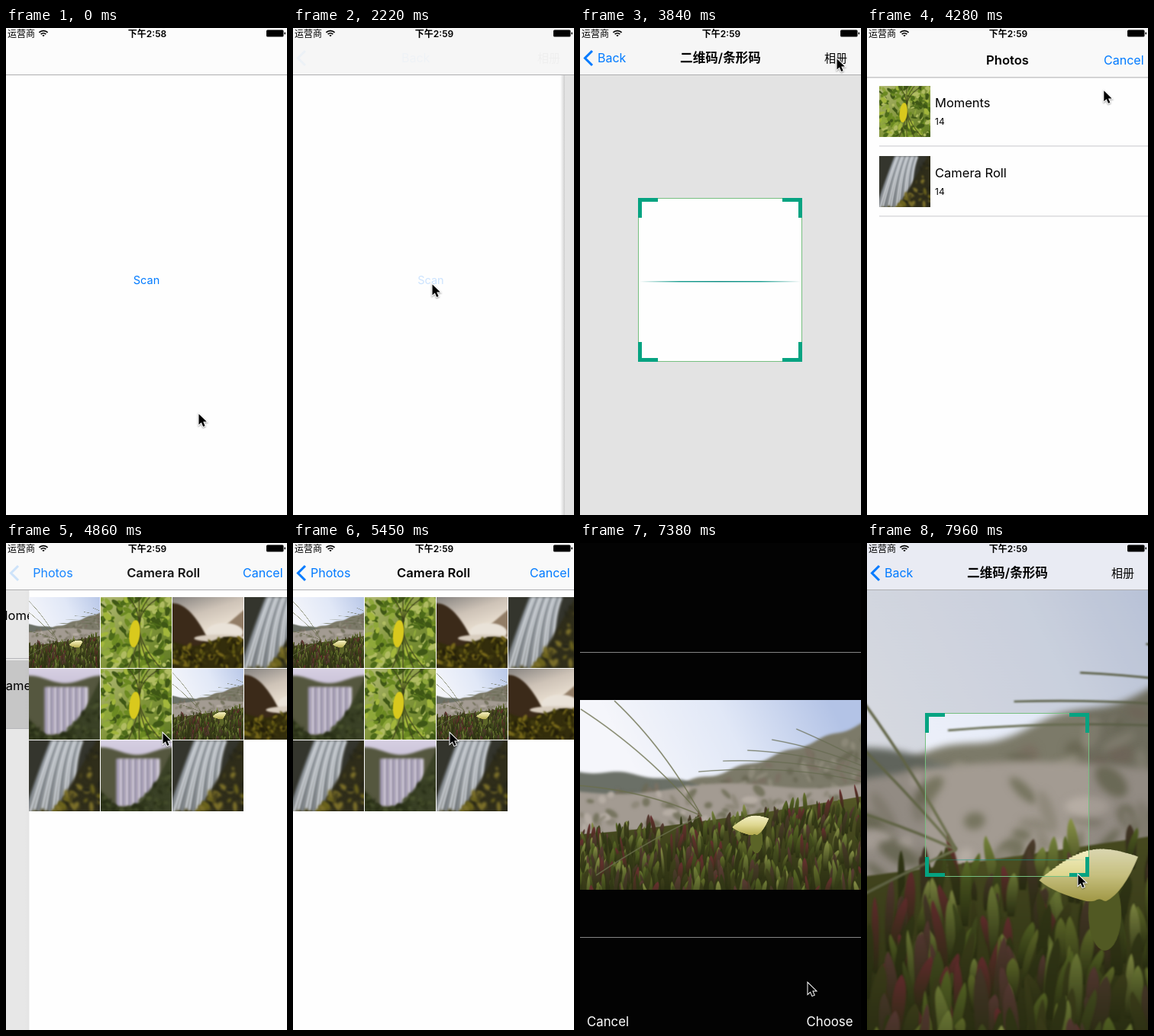
An HTML page with a canvas that plays this animation: 368x639 px, repeating every 8 s.

```html
<!DOCTYPE html>
<html lang="zh-CN">
<head>
<meta charset="utf-8">
<title>Scan demo</title>
<style>
html, body { margin: 0; width: 100%; height: 100%; overflow: hidden; background: #fff; }
canvas { display: block; width: 100vw; height: 100vh; }
</style>
</head>
<body>
<canvas id="stage" width="368" height="639"></canvas>
<script>
const W = 368, H = 639, LOOP = 8000, STEP = 147.2;
const BLUE = '#007aff', TEAL = '#05a381', LILAC = ['#d6cfe2', '#a49bb8'];
const FONT = "Inter, 'Noto Sans CJK SC', 'Noto Sans CJK', sans-serif";
const ctx = document.getElementById('stage').getContext('2d');

// ---------- drawing helpers ----------
function rect(g, fill, x, y, w, h) {
  g.fillStyle = fill;
  g.fillRect(x, y, w, h);
}
function gradient(g, x0, y0, x1, y1, ...colors) {
  const grad = g.createLinearGradient(x0, y0, x1, y1);
  colors.forEach((c, i) => grad.addColorStop(i / (colors.length - 1), c));
  return grad;
}
function curve(g, color, width, x0, y0, cx, cy, x1, y1) {
  g.strokeStyle = color;
  g.lineWidth = width;
  g.beginPath();
  g.moveTo(x0, y0);
  g.quadraticCurveTo(cx, cy, x1, y1);
  g.stroke();
}
// Fills everything below the line y = ridge(x).
function hill(g, fill, ridge) {
  g.fillStyle = fill;
  g.beginPath();
  g.moveTo(-30, 300);
  for (let x = -30; x <= 410; x += 3) g.lineTo(x, ridge(x));
  g.lineTo(410, 300);
  g.fill();
}
function ellipse(g, fill, x, y, rx, ry, turn = 0) {
  g.fillStyle = fill;
  g.beginPath();
  g.ellipse(x, y, rx, ry, turn, 0, 7);
  g.fill();
}
function text(str, x, y, size, color, weight = 400, align = 'left', alpha = 1) {
  ctx.save();
  ctx.globalAlpha *= alpha;
  ctx.font = `${weight} ${size}px ${FONT}`;
  ctx.textAlign = align;
  ctx.fillStyle = color;
  ctx.fillText(str, x, y);
  ctx.restore();
}
function at(x, y, draw) {
  ctx.save();
  ctx.translate(x, y);
  draw();
  ctx.restore();
}

// ---------- pictures ----------
function picture(w, h, scale, seed, draw) {
  const canvas = document.createElement('canvas');
  canvas.width = w * scale;
  canvas.height = h * scale;
  const g = canvas.getContext('2d');
  g.scale(scale, scale);
  draw(g, () => (seed = (seed * 16807) % 2147483647) / 2147483647);
  return canvas;
}
const pick = (rnd, list) => list[Math.floor(rnd() * list.length)];

// Soft spots on the part of a picture below a ridge.
function speckle(g, rnd, n, colors, w, h, ridge, size) {
  for (let i = 0; i < n; i++) {
    const x = rnd() * w, top = ridge(x);
    ellipse(g, pick(rnd, colors), x, top + rnd() * (h - top), size * (.4 + rnd()), size * (.2 + rnd() * .5), rnd() * 3);
  }
}
function blade(g, color, x, y, w, h, lean) {
  g.fillStyle = gradient(g, 0, y, 0, y - h, '#2b2f12', color);
  g.beginPath();
  g.moveTo(x - w / 2, y);
  g.bezierCurveTo(x - w, y - h / 2, x + lean - w, y - h * .9, x + lean, y - h);
  g.bezierCurveTo(x + lean + w, y - h * .8, x + w, y - h / 2, x + w / 2, y);
  g.fill();
}
function flower(g, x, y) {
  ellipse(g, '#5b6427', x + 8, y + 17, 8, 18);
  for (let p = 0; p <= 1; p += 1 / 28) {
    const tipX = x - 23 + 46 * p, tipY = y - 11 * p - 8 * Math.sin(p * Math.PI);
    curve(g, gradient(g, 0, y - 15, 0, y + 11, '#f5f1c8', '#ded790', '#b4aa4e'), 2.4, x + 8 * p, y + 10, tipX * .7 + x * .3, y + 6, tipX, tipY);
  }
}

const grass = picture(374, 249, 2.7, 71, (g, rnd) => {
  rect(g, gradient(g, 90, 120, 330, 0, '#f5f6fb', '#e1e8f7', '#b3c3e6'), 0, 0, 374, 249);
  const dune = x => 108 - 78 * Math.pow(Math.max(0, x - 135) / 239, 1.2) + 2 * Math.sin(x / 9);
  const meadow = x => 176 - 50 * Math.pow(Math.max(0, x) / 374, 1.3);
  g.filter = 'blur(5px)';
  hill(g, '#7c7a69', x => x < 135 ? 112 : dune(x));
  hill(g, '#6b7067', x => 94 + x * x / 1500 + 2 * Math.sin(x / 12));
  speckle(g, rnd, 150, ['#6c6a57', '#8d8979', '#7b7163'], 374, 150, x => dune(x) + 8, 7);
  hill(g, '#a39b92', x => 120 - x * .03 + 5 * Math.sin(x / 40));
  speckle(g, rnd, 110, ['#b6ada4', '#8f897b', '#777560'], 374, 175, x => 124 + 6 * Math.sin(x), 8);
  g.filter = 'blur(1px)';
  hill(g, gradient(g, 0, 130, 0, 249, '#545726', '#2b2f12'), meadow);
  const colors = ['#5a6a26', '#75833a', '#465020', '#353b17', '#66722c', '#8a9448', '#5c3c36', '#6b2f31', '#4c3b2c', '#40421c'];
  for (let i = 0; i < 620; i++) {
    const x = rnd() * 384 - 5, depth = i / 620, y = meadow(x) + 14 + depth * (260 - meadow(x));
    blade(g, pick(rnd, colors), x, y, 2 + rnd() * (1.5 + depth * 1.5), 18 + rnd() * (16 + depth * 12), rnd() * 14 - 6);
  }
  // Long stalks: one bundle meets left of the flower, the other fans out at the right edge.
  for (const [x, y] of [[4, 12], [48, 1], [0, 112], [24, 230]])
    curve(g, '#6b6f4d', 1.3, x, y, (x + 160) / 2 + 10, (y + 150) / 2 - 12, 162, 152);
  for (let i = 0; i < 5; i++)
    curve(g, '#666b50', 1, 158 + i * 32, 94 - i * 14, 280 + i * 12, 84 - i * 7, 374, 108 - i * 7);
  g.filter = 'none';
  flower(g, 226, 166);
});

const leaves = picture(93, 93, 2, 23, (g, rnd) => {
  rect(g, gradient(g, 0, 0, 93, 93, '#b4bb78', '#83963c', '#5f7a24'), 0, 0, 93, 93);
  g.filter = 'blur(1px)';
  speckle(g, rnd, 220, ['#6c8a22', '#8fa83b', '#4d6b19', '#b0bc62', '#3f5716', '#a2b63c'], 93, 93, () => 0, 6);
  for (let x = 36; x < 80; x += 14) curve(g, '#3f421d', 1.2, x, 0, 100 - x, 30, x, 93);
  ellipse(g, '#d9c91d', 44, 48, 7, 18, .1);
});

const river = picture(93, 93, 2, 5, (g, rnd) => {
  const cliff = x => 8 + x * x / 45, shore = x => 58 + 6 * Math.sin(x / 16);
  rect(g, gradient(g, 0, 0, 20, 60, '#85827f', '#cfc4b8', '#f1e7d8'), 0, 0, 93, 93);
  g.filter = 'blur(2px)';
  hill(g, '#927d66', x => 96 - x * .85);
  ellipse(g, '#e9e2d8', 68, 46, 24, 12);
  hill(g, '#3b2a19', cliff);
  ellipse(g, '#d8cdbf', 62, 54, 34, 5);
  hill(g, '#332d0c', shore);
  speckle(g, rnd, 110, ['#5e5713', '#241f0a', '#77681a', '#3f390f'], 93, 93, shore, 4);
});

const cascade = picture(93, 93, 2, 9, (g, rnd) => {
  const rock = x => 150 - x * 1.7;
  rect(g, '#34352d', 0, 0, 93, 93);
  g.filter = 'blur(3px)';
  for (let i = 0; i < 14; i++)
    curve(g, i % 3 ? '#d9dee5' : '#8d949c', 4, 30 + i * 3, 0, 16 + i * 3, 34, i * 5 - 4, 95);
  hill(g, '#2f2d1a', rock);
  speckle(g, rnd, 70, ['#6c641d', '#26261a', '#7c702a', '#48431d'], 93, 93, rock, 5);
});

const mist = picture(93, 93, 2, 13, (g, rnd) => {
  const bank = x => 66 + 24 * Math.sin(x / 20);
  rect(g, gradient(g, 0, 0, 0, 93, ...LILAC), 0, 0, 93, 93);
  g.filter = 'blur(3px)';
  hill(g, '#55573f', x => 14 - 5 * Math.cos(x / 15));
  for (let x = 20; x < 76; x += 4) rect(g, LILAC[x / 4 % 2], x, 24, 5, 62);
  hill(g, '#343b20', bank);
  hill(g, '#3a4126', x => 200 - x * 2);
  speckle(g, rnd, 70, ['#49522e', '#262c15'], 93, 93, bank, 4);
});

const album = [grass, leaves, river, cascade, mist, leaves, grass, river, cascade, mist, cascade];

function thumbnail(image, x, y, size) {
  const side = image.height;
  ctx.drawImage(image, (image.width - side) / 2, 0, side, side, x, y, size, size);
}

// ---------- motion ----------
// Remaining share of a slide that starts at a given step: 1 before, settling to 0.
function remaining(step, start) {
  const u = Math.max(0, step - start) * 3.5;
  const left = (1 + u) * Math.exp(-u);
  return left < .004 ? 0 : left;
}
// Pointer stops: step of arrival, x, y, steps of rest.
const stops = [
  [0, 252, 506, 0], [5, 140, 400, 0], [9, 182, 336, 8], [25, 336, 40, 3],
  [33, 205, 249, 5], [40, 327, 499, 0], [46, 328, 617, 3], [50, 298, 577, 0], [54, 276, 435, 9]
];
function cursorAt(step) {
  const i = stops.findLastIndex(([arrive]) => arrive <= step);
  const [arrive, x, y, rest] = stops[i];
  const [next, toX, toY] = stops[i + 1] || [Infinity, x, y];
  const p = Math.max(0, step - arrive - rest) / (next - arrive - rest);
  return [x + (toX - x) * p, y + (toY - y) * p];
}

// ---------- interface parts ----------
function navBar(color) {
  rect(ctx, color, 0, 0, W, 61);
  rect(ctx, '#aeaeb0', 0, 61, W, 1);
}
function backButton(label, titleLeft, left) {
  ctx.save();
  ctx.globalAlpha = Math.max(.04, 1 - left * 10);
  ctx.strokeStyle = BLUE;
  ctx.lineWidth = 3;
  ctx.stroke(new Path2D('M16 30L6.5 39.5L16 49'));
  ctx.restore();
  text(label, 23 + (titleLeft - 23) * left, 45, 16, BLUE, 400, 'left', 1 - left);
}
function title(label, left) {
  text(label, 184 + W * left * .73, 45, 16.6, '#000', 600, 'center', 1 - left);
}
function edgeShadow(left) {
  const x = W * left;
  rect(ctx, gradient(ctx, x - 6, 0, x, 0, 'rgba(0,0,0,0)', `rgba(0,0,0,${left * .2})`), x - 6, 0, 6, H);
}
function statusBar(clock) {
  text('运营商', 2, 11.5, 12, '#000');
  text(clock, 185, 11.5, 12, '#000', 600, 'center');
  ctx.strokeStyle = '#000';
  ctx.lineWidth = 1.7;
  for (let r = 1.5; r < 9; r += 3.2) {
    ctx.beginPath();
    ctx.arc(49, 11.5, r, -Math.PI * .75, -Math.PI * .25);
    ctx.stroke();
  }
  ctx.fillStyle = '#000';
  ctx.beginPath();
  ctx.roundRect(341, 2.5, 22.5, 9, 1.5);
  ctx.roundRect(364.5, 5.5, 1.5, 3, 1);
  ctx.fill();
}
function cursor(x, y) {
  ctx.save();
  ctx.translate(x, y);
  ctx.shadowColor = 'rgba(0,0,0,.4)';
  ctx.shadowBlur = 2;
  ctx.shadowOffsetY = 1;
  const shape = new Path2D('M.5 .5V14.5L3.8 11.4L6.2 17L8.6 16L6.2 10.6H10.8Z');
  ctx.strokeStyle = '#fff';
  ctx.lineWidth = 2;
  ctx.stroke(shape);
  ctx.shadowColor = 'transparent';
  ctx.fillStyle = '#000';
  ctx.fill(shape);
  ctx.restore();
}

// ---------- screens ----------
function homePage(pressed) {
  rect(ctx, '#fefefe', 0, 0, W + 120, H);
  text('Scan', 184, 336, 14.5, BLUE, 400, 'center', pressed ? .2 : 1);
}
function scannerPage(step, picked) {
  const x = 76, y = 223, size = 215;
  rect(ctx, '#fefefe', 0, 0, W, H);
  if (picked) ctx.drawImage(grass, -321, -8, 1010, 672);
  ctx.fillStyle = 'rgba(0,0,0,.105)';
  ctx.beginPath();
  ctx.rect(0, 0, W, H);
  ctx.rect(x, y, size, size);
  ctx.fill('evenodd');

  ctx.strokeStyle = '#76bf80';
  ctx.lineWidth = 1;
  ctx.strokeRect(x + .5, y + .5, size - 1, size - 1);
  for (const dx of [1, -1]) for (const dy of [1, -1]) {
    const cornerX = dx > 0 ? x : x + size, cornerY = dy > 0 ? y : y + size;
    rect(ctx, TEAL, cornerX, cornerY, 26 * dx, 5 * dy);
    rect(ctx, TEAL, cornerX, cornerY, 5 * dx, 26 * dy);
  }
  const line = Math.max(0, step - 16.4) * 33.7 % size, clear = 'rgba(10,145,130,0)';
  ctx.globalAlpha = picked ? .45 : 1;
  rect(ctx, gradient(ctx, x + 2, 0, x + size - 2, 0, clear, '#159c8e', '#078a80', '#159c8e', clear),
    x + 2, Math.round(y + line), size - 4, 1.4);
  ctx.globalAlpha = 1;
}
function albumList(selected) {
  rect(ctx, '#fefefe', 0, 61, W, H);
  if (selected) rect(ctx, '#d9d9d9', 0, 154, W, 90);
  ['Moments', 'Camera Roll'].forEach((name, i) => {
    const y = 62 + i * 92;
    thumbnail(i ? cascade : leaves, 16, y + 11, 67);
    text(name, 89, y + 39, 16.5, '#000');
    text('14', 89, y + 62, 12, '#000');
    rect(ctx, '#c8c8cc', 16, y + 89, W, 1);
  });
}
function photoGrid() {
  rect(ctx, '#fefefe', 0, 0, W, H);
  album.forEach((image, i) => thumbnail(image, i % 4 * 94, 71 + Math.floor(i / 4) * 94, 93));
}
function cropPage() {
  rect(ctx, '#030303', -3, 0, W + 6, H);
  ctx.drawImage(grass, -3, 206, 374, 249);
  ctx.strokeStyle = '#858585';
  ctx.lineWidth = 1;
  ctx.strokeRect(-2.5, 143.5, 373, 374);
  text('Cancel', 9, 634, 16.8, '#fff');
  text('Choose', 357.5, 634, 16.8, '#fff', 400, 'right');
}
function picker(step) {
  const gridLeft = remaining(step, 31.82), cropLeft = remaining(step, 38.7);
  const gridX = W * gridLeft, cropX = W * cropLeft, pushed = cropLeft < 1;
  const shade = amount => rect(ctx, `rgba(0,0,0,${amount * .1})`, 0, 0, W + 120, H);

  if (gridLeft > 0) at(-.3 * (W - gridX), 0, () => { albumList(step >= 31); shade(1 - gridLeft); });
  if (gridLeft < 1 && cropLeft > 0) {
    edgeShadow(gridLeft);
    at(gridX - .3 * (W - cropX), 0, () => { photoGrid(); shade(1 - cropLeft); });
  }
  at(pushed ? cropX - 374 : 0, pushed ? -20 : 0, () => {
    navBar('#f9f9f9');
    if (gridLeft === 1) {
      title('Photos', 0);
    } else {
      backButton('Photos', 171, gridLeft);
      title('Camera Roll', gridLeft);
    }
    text('Cancel', 362.5, 45, 16, BLUE, 400, 'right');
  });
  if (pushed) at(cropX, 0, cropPage);
}

function draw(step) {
  const picked = step >= 50, left = remaining(step, 14.92), x = W * left;
  if (left > 0) at(-.3 * (W - x), 0, () => homePage(step >= 13));
  if (left < 1) {
    edgeShadow(left);
    at(x, 0, () => scannerPage(step, picked));
  }
  navBar(picked ? '#e9ebf3' : left < 1 ? '#f6f6f6' : '#fcfcfc');
  if (left < 1) {
    backButton('Back', 146, left);
    title('二维码/条形码', left);
    text('相册', 320, 45, 15, '#000', 400, 'left', 1 - left);
  }

  const rise = remaining(step, 26.9), fall = 1 - remaining(step, 50.85);
  if (rise < 1 && fall < 1) at(0, H * Math.max(rise, fall), () => picker(step));
  if (step < 39 || step > 50) statusBar(step < 10 ? '下午2:58' : '下午2:59');
  cursor(...cursorAt(step));
}

function tick(now) {
  draw(Math.floor((now % LOOP + 2) / STEP));
  requestAnimationFrame(tick);
}
draw(0);
requestAnimationFrame(tick);
</script>
</body>
</html>
```
